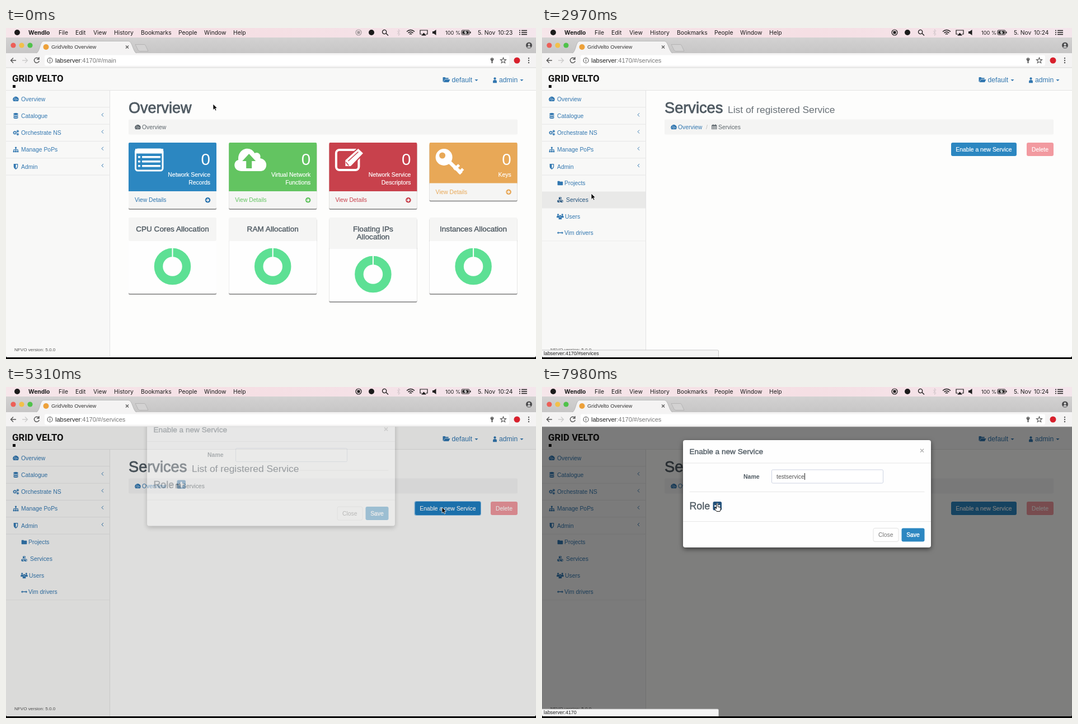
Animation of 947 by 592 pixels, one loop 8000 ms. Source, as an HTML page:

```html
<!DOCTYPE html>
<html lang="en">
<head>
<meta charset="utf-8">
<title>Dashboard walkthrough</title>
<style>
html, body { margin: 0; width: 100%; height: 100%; overflow: hidden; background: #000; }
svg { display: block; width: 100vw; height: 100vh; font-family: "Liberation Sans", Arial, sans-serif; font-size: 10.4px; }
.ui { font-family: Inter, sans-serif; font-size: 10.3px; }
.logo { font-family: Roboto, sans-serif; font-weight: 600; }
.medium { stroke: currentColor; stroke-width: .4; }
.heading { stroke: currentColor; stroke-width: .8; }
.light { stroke: currentColor; stroke-width: .2; }
.card { filter: drop-shadow(0 2px .7px #4448); }
</style>
</head>
<body>
<svg id="stage" viewBox="0 0 947 592"></svg>
<script>
const LOOP = 8000;
const HOST = 'labserver:4170';
const LINK = '#3277b0', LINK_HOVER = '#23527c', GREY = '#5c656b', HEAD = '#505b63';
const BLUE = '#2c87c1', GREEN = '#63c461', RED = '#c8414c', ORANGE = '#e8a857';

// Markup helpers
const text = (x, y, s, fill = '#222', size = '', extra = '') =>
  `<text x="${x}" y="${y}" fill="${fill}" color="${fill}" ${size && `style="font-size:${size}px"`} ${extra}>${s}</text>`;
const rect = (x, y, w, h, fill, r = 0, extra = '') =>
  `<rect x="${x}" y="${y}" width="${w}" height="${h}" rx="${r}" fill="${fill}" ${extra}/>`;
const circle = (x, y, r, fill, extra = '') => `<circle cx="${x}" cy="${y}" r="${r}" fill="${fill}" ${extra}/>`;
const path = (d, fill = 'none', extra = '') => `<path d="${d}" fill="${fill}" fill-rule="evenodd" ${extra}/>`;
const line = (d, color, width = 1) => path(d, 'none', `stroke="${color}" stroke-width="${width}"`);
const group = (id, content) => `<g id="${id}">${content}</g>`;
const END = ' text-anchor="end"', MID = ' text-anchor="middle"';
const MEDIUM = ' class="medium"', HEADING = ' class="heading"', LIGHT = ' class="light"';

// Small icons on a 16-unit grid
const gear = (x, y, r) => `<circle cx="${x}" cy="${y}" r="${r}" fill="none" stroke="currentColor" stroke-width="2"/>
  <circle cx="${x}" cy="${y}" r="${r + 1.4}" fill="none" stroke="currentColor" stroke-width="1.4" stroke-dasharray="1.6"/>`;
const cube = (x, y) => `M${x} ${y}l3.6 1.6v4.4l-3.6 1.6-3.6-1.6v-4.4ZM${x} ${y + 1}l-2 .9 2 .9 2-.9ZM${x + .6} ${y + 3.8}v2.4l2-.9v-2.4Z`;
const person = x => `M${x - 2.5} 5a2.5 2.5 0 1 1 5 0a2.5 2.5 0 1 1-5 0ZM${x - 4} 14v-3q0-3 3-3h2q3 0 3 3v3Z`;
const solid = (d, transform = '') => path(d, 'currentColor', transform && `transform="${transform}"`);
const icons = {
  gauge: solid('M2 14A7.5 7.5 0 1 1 14 14ZM7.2 12l1.6 0 1-5-1-.3ZM3 9h2v1.5H3ZM4.5 5.3h2v1.6h-2ZM11.5 9h2v1.5h-2Z'),
  database: solid('M2 3c0-3 12-3 12 0v1c0 3-12 3-12 0ZM2 6.4c3 2 9 2 12 0v2c0 3-12 3-12 0ZM2 10.8c3 2 9 2 12 0v2.2c0 3-12 3-12 0Z'),
  gears: gear(5.5, 8, 3) + gear(13, 4, 1.4) + gear(13, 12, 1.4),
  tree: solid('M6 1h4v4H8.8v2.2H14V11h1v4h-4v-4h1.5V8.7H8.8V11H10v4H6v-4h1.2V8.7H3.5V11H5v4H1v-4h1V7.2h5.2V5H6Z'),
  shield: solid('M2.5 1h11v7c0 4-3 6-5.5 7.5C5.5 14 2.5 12 2.5 8ZM8 3v10c2-1.3 3.7-2.8 3.7-5V3Z'),
  folder: solid('M1 3.5q0-1 1-1h4q1 0 1 1.5h7q1 0 1 1v7.5q0 1-1 1H2q-1 0-1-1Z'),
  folderOpen: solid('M0 12V3.5q0-1 1-1h4l1 1.5h6.5v2.5H5L1 12.5ZM5 7.5H16l-3 6H1.3Z'),
  cubes: solid(cube(8, .4) + cube(4.2, 8) + cube(11.8, 8)),
  user: solid(person(8), 'translate(-2 -2)scale(1.25)'),
  users: solid(person(2.8) + person(15), 'translate(0 -1)scale(.9)') + solid(person(8), 'translate(0 2)'),
  arrows: solid('M0 8l3.5-3.5V7h9V4.5L16 8l-3.5 3.5V9h-9v2.5Z'),
  calendar: solid('M1 3h3V1h2v2h4V1h2v2h3v12H1Z' + [6.3, 9.2, 12].map(y => [2.5, 6.5, 10.5].map(x => `M${x} ${y}h3v2h-3Z`).join('')).join('')),
  go: solid('M1 8a7 7 0 1 1 14 0a7 7 0 1 1-14 0ZM3.5 6.8v2.4H8l-1.8 1.9 1.6 1.5L12.3 8 7.8 3.4 6.2 4.9 8 6.8Z'),
};
const icon = (name, x, y, size, color) =>
  `<g transform="translate(${x} ${y})scale(${size / 16})" color="${color}">${icons[name]}</g>`;

function menuBar() {
  const ink = '#1b1b1b';
  const words = [['File', 94], ['Edit', 124], ['View', 156], ['History', 193], ['Bookmarks', 241], ['People', 308], ['Window', 354], ['Help', 406]];
  return rect(0, 0, 947, 17, 'url(#menuTint)') + circle(20, 8, 5, ink) + `<g class="ui">` +
    text(40, 11.8, 'Wendlo', ink, '', 'font-weight="700"') +
    words.map(([word, x]) => text(x, 11.8, word, ink)).join('') +
    text(785, 11.5, '100 %', ink, 9.2) + text(843, 11.8, '5. Nov', ink) +
    text(879, 11.8, '<tspan id="clock"></tspan>', ink) + '</g>' +
    group('record', circle(630, 8, 5, 'none', 'stroke="currentColor" stroke-width="1.2"') + rect(627.5, 5.5, 5, 5, 'currentColor', 1)) +
    circle(653, 8, 5, ink) +
    line('M679 9.5l4 4M672.5 7a3.6 3.6 0 1 1 7.2 0a3.6 3.6 0 1 1-7.2 0', ink, 1.3) +
    line('M699 5l5 6-2.5 2.5v-11l2.5 2.5-5 6', '#d5c8cd') +
    line('M716 6.5q7-6 14 0M718.5 9q4.5-4 9 0M721 11.2q2-2 4 0', ink, 1.5) +
    line('M743 11h-3V4h13v7h-3', ink, 1.2) + path('M742 13.5l4.500-5 4.500 5Z', ink) +
    path('M762 6h2.5l4-3v10l-4-3H762Z', ink) +
    rect(814, 4, 14, 8, 'none', 1.5, `stroke="${ink}"`) + rect(815.5, 5.5, 11, 5, ink) + rect(829, 6.5, 1.5, 3, ink) +
    path('M822 4l-4 4.5h3l-1 3.5 4-4.5h-3Z', '#fff') +
    line('M917 4.5h2M921 4.5h10M917 8h2M921 8h10M917 11.5h2M921 11.5h10', ink, 1.4);
}

function browserFrame() {
  const [hostName, port] = HOST.split(':'), ink = '#555', edge = 'stroke="#aaa" stroke-width=".7"';
  return rect(0, 17, 947, 29, 'url(#stripTint)') +
    circle(13, 31, 4.6, '#ed5f58') + circle(28, 31, 4.6, '#f2c04a') + circle(43, 31, 4.6, '#4fc24a') +
    path('M53 45.5C61 44 60 24 67 23.5H219C226 24 227 44 234 45.5Z', '#f4f3f3', edge) +
    path('M231 29.5h16q2 0 3 3l4 9h-15q-2 0-3-2Z', '#d3d2d2', edge) +
    circle(71.5, 34, 5, '#eda13a') + text(81, 37.3, 'GridVelto Overview', '#333', 9.4) +
    line('M214 31.5l5 5M219 31.5l-5 5', ink, 1.1) +
    circle(934.5, 31, 5.5, '#4b4b4d') + circle(934.5, 29.5, 2, '#d0d0d0') + path('M931 34.5q3.5-5 7 0q-3.5 2-7 0Z', '#d0d0d0') +
    rect(0, 45, 947, 26, '#f4f3f3') + rect(69, 48.5, 830, 19, '#fff', 3) + rect(0, 70.5, 947, .8, '#cfcfcf') +
    line('M18 58H9M13 53.5L8.5 58L13 62.5', ink, 1.4) + line('M29 58h9M34 53.5L38.5 58L34 62.5', '#ccc', 1.4) +
    line('M58.5 55a4.500 4.500 0 1 0 .8 4M59 52v4h-4', ink, 1.4) +
    line('M74 58a4.500 4.500 0 1 1 9 0a4.500 4.500 0 1 1-9 0M78.5 57v3.5M78.5 55v1.2', ink, 1.1) +
    text(88, 61.8, `${hostName}<tspan fill="#777">:${port}/#/<tspan id="route"></tspan></tspan>`, '#222', 11) +
    circle(868.5, 56, 2.8, ink) + rect(867.5, 57, 2, 6, ink) + circle(868.5, 55.2, .8, '#fff') +
    line('M888.5 53l1.4 3.4 3.6.2-2.8 2.4 1 3.6-3.2-2-3.2 2 1-3.600-2.8-2.4 3.6-.2Z', ink, 1.1) +
    circle(913, 58, 5.5, '#d8202c') + [54, 58, 62].map(y => circle(934, y, 1.2, ink)).join('');
}

const navRow = (label, name, y) => icon(name, 12, y - 9.2, 11, 'currentColor') +
  text(27, y, label, 'currentColor') + (name === 'gauge' ? '' : line(`M174 ${y - 8.5}l-3 3 3 3`, LINK));
const subRow = (label, name, y, x) => icon(name, 27, y - 9.2, 11, 'currentColor') + text(x, y, label, 'currentColor');

function sidebar() {
  const rows = [['Overview', 'gauge', 130.5], ['Catalogue', 'database', 160.8], ['Orchestrate NS', 'gears', 191], ['Manage PoPs', 'tree', 221.2]];
  return rect(0, 71, 947, 41, '#f8f8f7') + rect(0, 112, 185, 478, '#f8f8f7') +
    line('M0 111.5H947M185.5 112V590', '#e3e3e3') +
    text(11, 95.5, 'GRID VELTO', '#111', 16.8, 'class="logo"') + rect(12, 102, 5, 5, '#111') +
    icon('folderOpen', 780.5, 86, 13, LINK) + text(796.5, 97, 'default', LINK, 12.2) + path('M837.5 92h6l-3 3Z', LINK) +
    icon('user', 868, 87.5, 11, LINK) + text(881, 97, 'admin', LINK, 12.2) + path('M918.5 92h6l-3 3Z', LINK) +
    rect(0, 233, 185, 30, '#ededec', 0, 'id="adminHover"') +
    line('M0 141.8H185M0 172.2H185M0 202.5H185M0 232.8H185M0 263H185', '#e6e6e6') +
    `<g color="${LINK}">` + rows.map(row => navRow(...row)).join('') + group('admin', navRow('Admin', 'shield', 251.5)) +
    `<g clip-path="url(#submenuClip)">` + rect(0, 292.5, 185, 30, '#e9e9e8', 0, 'id="servicesHover"') +
    subRow('Projects', 'folder', 281.2, 40) + group('services', subRow('Services', 'cubes', 310.8, 43)) +
    subRow('Users', 'users', 340.5, 41) + subRow('Vim drivers', 'arrows', 370, 40) + line('M0 381H185', '#e6e6e6') + '</g></g>' +
    text(15, 578, 'NFVO version: 5.0.0', '#555', 8.1);
}

// Large card glyphs, relative to the card corner
const glyphs = [
  rect(12.5, 12, 48.5, 38, 'none', 4, 'stroke="#fff" stroke-width="3"') + rect(12, 11, 50, 8.5, '#fff') +
    [26, 34, 42].map(y => rect(17, y - 2, 4, 3.6, '#fff', 1) + rect(24, y - 2, 33, 3.6, '#fff', 1)).join(''),
  path('M23 51C7 51 7 33 17 31C15 10 39 4 46 19C52 16 58 21 56 28C72 31 69 51 57 51Z', '#fff') + path('M36 20l12 13h-7v13H31V33h-7Z', GREEN),
  rect(12.5, 13, 40.5, 36, 'none', 6, 'stroke="#fff" stroke-width="4"') +
    path('M28 43v-12L52 9.5l10 9.5L39 43Z', '#fff', `stroke="${RED}" stroke-width="2"`) + line('M34 33L52 16.500M30 35l5 6', RED, 1.5),
  circle(26, 26, 15, '#fff') + circle(23, 23, 5.5, ORANGE) +
    line('M34 33L57 55', '#fff', 6.5) + line('M44 48l9-8M52 55l8-8', '#fff', 5),
];

function overviewPage() {
  const counts = [[BLUE, ['Network Service', 'Records']], [GREEN, ['Virtual Network', 'Functions']], [RED, ['Network Service', 'Descriptors']], [ORANGE, ['Keys']]];
  const gauges = [['CPU Cores Allocation'], ['RAM Allocation'], ['Floating IPs', 'Allocation'], ['Instances Allocation']];
  const column = (i, y) => `transform="translate(${219 + i * 179.2} ${y})" class="card"`;
  const countCard = ([color, label], i) => {
    const h = label.length > 1 ? 87 : 72.5, footer = i ? color : '#2b74ae';
    return `<g ${column(i, 205)}>` + rect(0, 0, 157, h + 31, '#f5f5f4', 2) + path(`M0 ${h}V2q0-2 2-2h153q2 0 2 2V${h}Z`, color) +
      glyphs[i] + text(146, 40, '0', '#fff', 29.5, END) +
      label.map((s, n) => text(146, 60.8 + n * 14.6, s, '#fff', 10.4, END + LIGHT)).join('') +
      text(11, h + 19.3, 'View Details', footer, 10.3) + icon('go', 136, h + 10.3, 11, footer) + '</g>';
  };
  const gaugeCard = (label, i) => {
    const extra = (label.length - 1) * 14;
    return `<g ${column(i, 339)}>` + rect(0, 0, 157, 136 + extra, '#fefefe', 2) + rect(0, 0, 157, 42 + extra, '#f5f5f4', 2) +
      label.map((s, n) => text(78.5, 25 + n * 14.2, s, HEAD, 13.6, MID + MEDIUM)).join('') +
      circle(78.5, 87.5 + extra, 25, 'none', 'stroke="#5de094" stroke-width="15.5"') +
      rect(77.5, 53 + extra, 2, 19, '#fefefe') + '</g>';
  };
  return text(219, 151.5, 'Overview', HEAD, 27, HEADING) + rect(219, 163.5, 695, 27, '#f4f4f3', 2) +
    icon('gauge', 230, 171.5, 11, GREY) + text(243, 180.6, 'Overview', GREY) +
    counts.map(countCard).join('') + gauges.map(gaugeCard).join('');
}

function servicesPage() {
  return text(219, 151.5, 'Services', HEAD, 27.2, HEADING) + text(332, 151.5, 'List of registered Service', '#697177', 17.4) +
    rect(219, 163.5, 695, 27, '#f4f4f3', 2) + icon('gauge', 230, 171.5, 11, LINK) + text(243, 180.6, 'Overview', LINK) +
    text(293, 180.6, '/', '#bbb') + icon('calendar', 302.5, 171.5, 10.5, GREY) + text(315, 180.6, 'Services', GREY) +
    rect(729.5, 204, 119.5, 26, '#8fc4ea', 3.5, 'id="focusRing"') +
    rect(731, 205, 117, 24, BLUE, 3, 'id="enable"') + text(789.4, 220.5, 'Enable a new Service', '#fff', 10.35, MID + LIGHT) +
    rect(866, 205, 48, 24, '#f29aa0', 3) + text(890, 220.5, 'Delete', '#fff', 10.3, MID + LIGHT);
}

function modal() {
  return rect(252, 95, 443, 192, '#fefefe', 4, 'style="filter:drop-shadow(0 3px 4px #0008)"') +
    text(263.5, 119.8, 'Enable a new Service', HEAD, 13.6, MEDIUM) + line('M676 110.8l6 6M682 110.8l-6 6', '#b5b5b5', 1.6) +
    line('M252 136H695M263.5 187.5H683.5M252 240.5H695', '#e6e6e6') +
    text(360, 163.8, 'Name', HEAD, 10.5, 'font-weight="700"') +
    rect(410.5, 148, 199, 24, '#fff', 2, 'stroke="#cdd3e2"') + text(419, 163.8, '', '#555', 10.4, 'id="typed"') +
    rect(0, 154, 1, 12, '#222', 0, 'id="caret"') +
    text(263.5, 219, 'Role', HEAD, 17.8, MEDIUM) + rect(305.5, 205, 15.5, 15.5, LINK, 2.5, 'id="plus"') +
    line('M313.2 207.8v10M308.2 212.8h10', '#fff', 3) +
    rect(592, 252.5, 45, 24, '#fefefe', 3, 'stroke="#e2e2e2"') + text(614.3, 268, 'Close', '#777', 10.4, MID) +
    rect(642.5, 252.5, 41, 24, BLUE, 3) + text(663, 268, 'Save', '#fff', 10.3, MID + MEDIUM);
}

const pointers = {
  arrow: path('M0 0V10.5L2.5 8.3L4.2 12L6 11.2L4.4 7.6H7.6Z', '#000', 'stroke="#fff" stroke-width=".8"'),
  beam: line('M-2 -5.5Q0 -5.5 0 -4V4Q0 5.5 -2 5.5M2 -5.5Q0 -5.5 0 -4V4Q0 5.5 2 5.5', '#222'),
  hand: path('M-1.5 -3q0-1.5 1.3-1.5t1.3 1.5v4l4 1q1.5.4 1.4 2l-.6 3-1 2.5H-1L-4.5 5q-1-2 .5-2l2.5 1.5Z', '#fff', 'stroke="#111"'),
};

document.getElementById('stage').innerHTML = `<defs>
  <linearGradient id="menuTint"><stop stop-color="#f6e6ea"/><stop offset=".5" stop-color="#f5dfe4"/><stop offset="1" stop-color="#f4e6ec"/></linearGradient>
  <linearGradient id="stripTint" x2="0" y2="1"><stop stop-color="#d3d2d2"/><stop offset="1" stop-color="#c6c5c5"/></linearGradient>
  <clipPath id="submenuClip"><rect id="submenu" y="263" width="186" height="0"/></clipPath>
  <clipPath id="pageClip"><path d="M0 71.3H947V586q0 3-3 3H3q-3 0-3-3Z"/></clipPath></defs>` +
  rect(0, 0, 947, 592, '#000') + menuBar() + browserFrame() +
  `<g clip-path="url(#pageClip)">` + rect(0, 71, 947, 520, '#fdfdfc') + sidebar() +
  group('overviewPage', overviewPage()) + group('servicesPage', servicesPage()) +
  rect(0, 71, 947, 520, '#000', 0, 'id="backdrop"') + group('modal', modal()) +
  group('status', rect(-3, 576, 318.5, 16, '#f4f4f4', 2, 'stroke="#bbb" stroke-width=".8"') + text(3, 585.3, '', '#222', 8.9, 'id="statusText"')) + '</g>' +
  Object.keys(pointers).map(name => group(name, pointers[name])).join('');

const el = Object.fromEntries([...document.querySelectorAll('[id]')].map(node => [node.id, node]));
const clamp = v => Math.max(0, Math.min(1, v));
const smooth = p => p * p * (3 - 2 * p);
const show = (node, on) => node.style.display = on ? '' : 'none';

const moves = [[0, 370, 136], [300, 370, 136], [1300, 170, 243], [1800, 170, 243], [2250, 88, 296], [3230, 88, 296], [3950, 663, 238],
  [4100, 663, 238], [4700, 779, 215], [5600, 779, 215], [6120, 470, 160], [7420, 470, 160], [7850, 313, 213], [LOOP, 313, 213]];
const statuses = [[0, null], [1260, '/#'], [2030, '/#projects'], [2170, '/#services'], [3400, null], [7780, '']];
const TYPED = 'testservice', TYPE_START = 6280, KEY_MS = 105, MODAL_START = 5274, PAGE_SWITCH = 2700;

function pointerAt(t) {
  const i = Math.max(1, moves.findIndex(([at]) => at > t));
  const [t0, x0, y0] = moves[i - 1], [t1, x1, y1] = moves[i];
  const p = smooth(clamp((t - t0) / (t1 - t0)));
  return [x0 + (x1 - x0) * p, y0 + (y1 - y0) * p];
}

function render(t) {
  const within = (a, b) => t >= a && t < b;
  el.clock.textContent = t < 2000 ? '10:23' : '10:24';
  el.record.setAttribute('color', t < 400 ? '#a39a9d' : '#1b1b1b');
  el.route.textContent = t < PAGE_SWITCH ? 'main' : 'services';
  show(el.overviewPage, t < PAGE_SWITCH);
  show(el.servicesPage, t >= PAGE_SWITCH);

  const adminOn = within(1260, 2600), servicesOn = within(2170, 5230);
  show(el.adminHover, adminOn);
  show(el.servicesHover, servicesOn);
  el.admin.setAttribute('color', adminOn ? LINK_HOVER : LINK);
  el.services.setAttribute('color', servicesOn ? LINK_HOVER : LINK);
  el.submenu.setAttribute('height', 118.5 * smooth(clamp((t - 1620) / 350)));
  el.enable.setAttribute('fill', within(4620, 5450) ? '#1f7fc2' : BLUE);
  show(el.focusRing, within(5200, 5450));

  const since = t - MODAL_START, slide = clamp(since / 300);
  el.backdrop.setAttribute('opacity', clamp(since / 150) / 2);
  el.modal.setAttribute('opacity', clamp(since / 100));
  el.modal.setAttribute('transform', `translate(0 ${-48 * (1 - slide) ** 1.7})`);
  show(el.modal, since > 0);

  el.typed.textContent = TYPED.slice(0, Math.max(0, Math.ceil((t - TYPE_START) / KEY_MS)));
  show(el.caret, t >= 6180);
  if (t >= 6180) el.caret.setAttribute('x', 419.3 + el.typed.getComputedTextLength());
  el.plus.setAttribute('fill', t >= 7780 ? LINK_HOVER : LINK);

  const [, status] = statuses.filter(([at]) => at <= t).pop();
  show(el.status, status !== null);
  el.statusText.textContent = HOST + (status ?? '');

  const [x, y] = pointerAt(t);
  const inField = t > 5700 && x > 410 && x < 610 && y > 148 && y < 172;
  const shape = within(TYPE_START, 7420) ? '' : t >= 7780 ? 'hand' : inField ? 'beam' : 'arrow';
  for (const name in pointers) {
    show(el[name], name === shape);
    el[name].setAttribute('transform', `translate(${x} ${y})`);
  }
}

const started = performance.now();
function tick() {
  render((performance.now() - started) % LOOP);
  requestAnimationFrame(tick);
}
tick();
</script>
</body>
</html>
```
